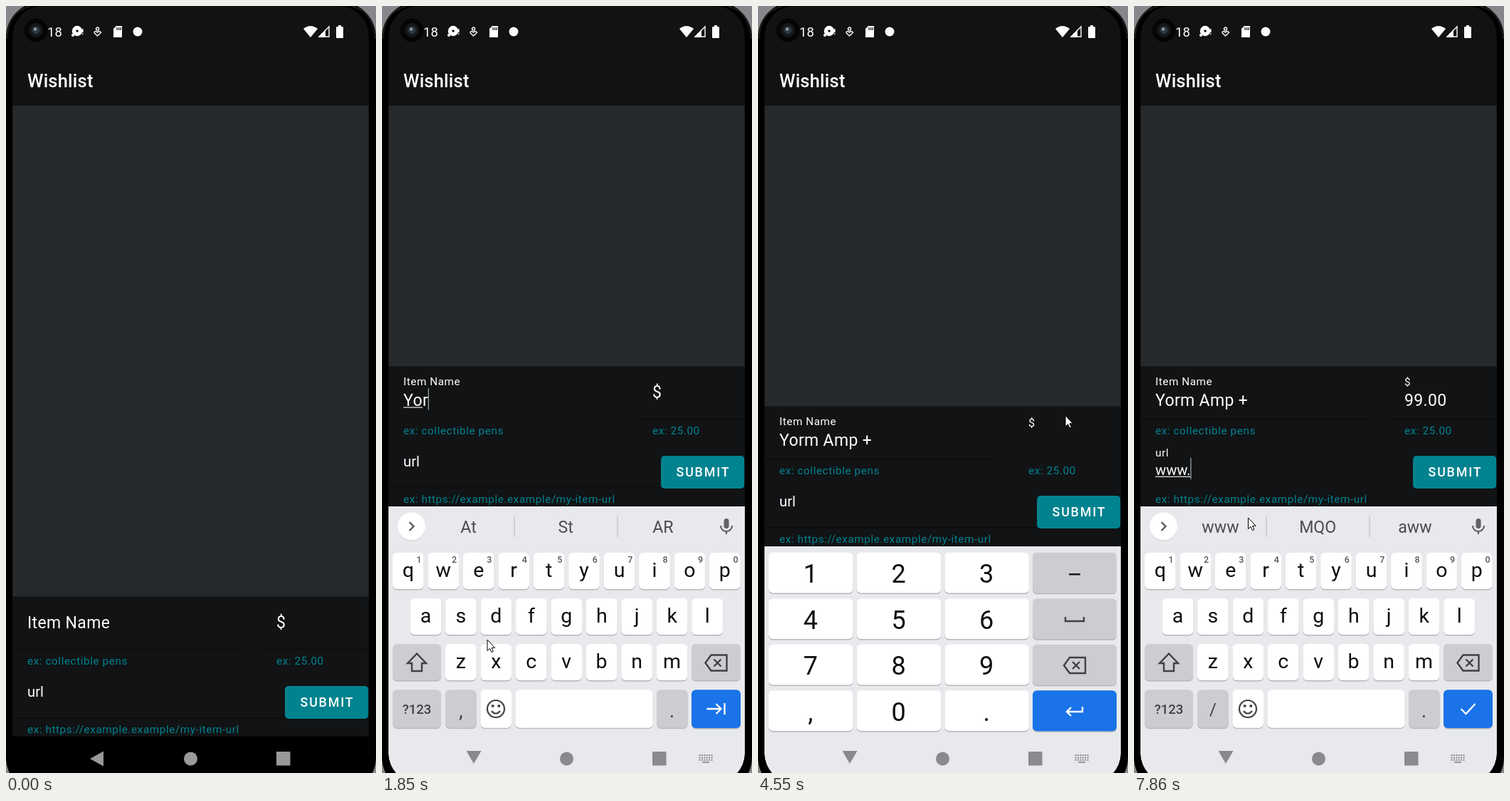
These frames come from a looping animation (520 by 1076 pixels, 8 s). An HTML page with a canvas:

```html
<!DOCTYPE html>
<html lang="en">
<head>
<meta charset="utf-8">
<title>Wishlist</title>
<style>
  html, body { margin: 0; width: 520px; height: 1076px; overflow: hidden; background: #000; }
  canvas { display: block; width: 520px; height: 1076px; }
</style>
</head>
<body>
<canvas id="stage"></canvas>
<script>
const LOOP = 8000, STEP = 66;
const canvas = document.getElementById('stage');
const ctx = canvas.getContext('2d');
const dpr = window.devicePixelRatio || 1;
canvas.width = 520 * dpr;
canvas.height = 1076 * dpr;

const TEAL = '#00838f', INK = '#3f4144', ICON = '#7f8286';

// time, text, underlined range, suggestions
const itemSteps = [
  [0, '', null, null],
  [1590, 'Y', null, ['I', 'A', 'The']],
  [1710, 'Yo', null, ['At', 'St', 'AR']],
  [1850, 'Yor', [0, 2], ['At', 'St', 'AR']],
  [1910, 'Yor', [0, 3], ['For', 'To', 'Or']],
  [1980, 'Yorm', [0, 4], ['Form', 'Storm', 'For']],
  [2180, 'Yorm ', null, ['and', 'is', 'the']],
  [2240, 'Yorm A', null, ['A', 'An', 'I']],
  [2380, 'Yorm Am', null, ['A', 'An', 'I']],
  [2570, 'Yorm Amp', [5, 8], ['Am', 'Amp', 'Ah']],
  [2770, 'Yorm Amp ', [5, 8], ['Amp', 'Amps', 'amplifier']],
  [3030, 'Yorm Amp ', null, ['and', 'for', 'battery']],
  [3170, 'Yorm Amp +', null, ['in', 'for', 'a']]
];
const priceSteps = [[0, ''], [5210, '9'], [5350, '99'], [5540, '99.'], [5740, '99.0'], [5940, '99.00']];
const urlSteps = [
  [0, '', null, null],
  [7460, 'w', null, null],
  [7600, 'ww', [0, 2], ['we', 'www', 'aww']],
  [7700, 'www', [0, 3], ['www', 'MQO', 'aww']],
  [7860, 'www.', [0, 4], ['www', 'MQO', 'aww']]
];

const clamp = v => Math.max(0, Math.min(1, v));
const span = (t, a, b) => clamp((t - a) / (b - a));
const mix = (a, b, p) => a + (b - a) * p;
const smooth = p => p * p * (3 - 2 * p);
const at = (steps, t) => steps.filter(s => s[0] <= t).pop();
const isNumeric = t => t >= 4480 && t < 6930;

function setFont(size, weight = 400, spacing = 0) {
  ctx.font = `${weight} ${size}px Roboto, sans-serif`;
  ctx.letterSpacing = spacing + 'px';
}
function text(str, x, y, size, color, { weight, spacing, align = 'left' } = {}) {
  setFont(size, weight, spacing);
  ctx.textAlign = align;
  ctx.fillStyle = color;
  ctx.fillText(str, x, y);
}
function rect(x, y, w, h, color, r = 0) {
  ctx.fillStyle = color;
  ctx.beginPath();
  ctx.roundRect(x, y, w, h, r);
  ctx.fill();
}
function disc(x, y, r, color) {
  ctx.fillStyle = color;
  ctx.beginPath();
  ctx.arc(x, y, r, 0, 7);
  ctx.fill();
}
function fill(d, x, y, color) {
  ctx.save();
  ctx.translate(x, y);
  ctx.fillStyle = color;
  ctx.fill(new Path2D(d));
  ctx.restore();
}
function line(d, x, y, color, width = 2.2) {
  ctx.save();
  ctx.translate(x, y);
  ctx.strokeStyle = color;
  ctx.lineWidth = width;
  ctx.stroke(new Path2D(d));
  ctx.restore();
}

function drawStatus() {
  disc(42, 34, 16.5, '#050506');
  disc(42, 34, 10, '#15181b');
  disc(42, 34, 5.5, '#2c3640');
  disc(41, 32.5, 2.2, '#8d9aa8');
  text('18', 58, 43, 18.5, '#fff');
  disc(100, 35, 7.2, '#fff');
  disc(100, 35, 1.8, '#111');
  disc(94, 41, 2, '#fff');
  rect(107, 32, 1.6, 5, '#fff');
  rect(107, 38.5, 1.6, 1.6, '#fff');
  line('M0 -6a2 2 0 1 0 .1 0M-5 1L0 6L5 1Q2 -2 0 1Q-2 -2 -5 1', 128.5, 36, '#fff', 1.5);
  fill('M-2 -8H6V8H-6V-4Z', 157, 36, '#fff');
  for (const x of [155.5, 158, 160.5]) rect(x, 30, 1.2, 4, '#111');
  disc(185, 36, 6.5, '#fff');
  fill('M0 8L-10 -4Q0 -12 10 -4Z', 428, 36, '#fff');
  line('M-7 7L7 -7V7Z', 447, 36, '#fff', 1.4);
  fill('M-8 8L2 -2V8Z', 447, 36, '#fff');
  rect(464, 29, 10, 16, '#fff', 1);
  rect(467, 27, 4, 3, '#fff');
}

// Text field: floating label, typed value, caret
function field(f, t) {
  const p = span(t, f.from, f.from + 172);
  text(f.label, f.x, mix(f.bigY, f.smallY, p), mix(f.size, 15.3, p), '#fff', { spacing: mix(f.gap, 0.55, p) });
  const [, value, under] = at(f.steps, t);
  text(value, f.x, f.valueY, f.size, '#fff', { spacing: f.gap });
  const w = n => ctx.measureText(value.slice(0, n)).width;
  if (under) rect(f.x + w(under[0]), f.valueY + 2, w(under[1]) - w(under[0]), 1.2, '#dfe0e0');
  if (t >= f.from + 200 && t < f.until) rect(f.x + w(value.length) - 0.3, f.valueY - 24, 1.2, 30, '#a9adb0');
}
const fields = [
  { label: 'Item Name', x: 30, bigY: 872.7, smallY: 854.9, valueY: 883.5, size: 23, gap: 0.35, steps: itemSteps, from: 770, until: 4420 },
  { label: '$', x: 380, bigY: 872.7, smallY: 854.9, valueY: 883.5, size: 23, gap: 0.35, steps: priceSteps, from: 4400, until: 6860 },
  { label: 'url', x: 30, bigY: 969.3, smallY: 955.3, valueY: 980.7, size: 20.2, gap: 0, steps: urlSteps, from: 6840, until: LOOP }
];

function drawForm(t, dy) {
  ctx.save();
  ctx.translate(0, dy);
  rect(9, 828.6, 501, 300, '#111315');
  const rule = (x, y, w) => rect(x, y, w, 1.2, '#090a0b');
  if (t < 930 || t >= 4420) rule(9, 902, 325);
  if (t < 4420 || t >= 6860) rule(360, 902, 150);
  if (t < 6860) rule(9, 998.5, 501);
  fields.forEach(f => field(f, t));
  const hint = (s, x, y) => text(s, x, y, 15.3, TEAL, { spacing: 0.57 });
  hint('ex: collectible pens', 30, 924);
  hint('ex: 25.00', 380, 924);
  hint('ex: https://example.example/my-item-url', 30, 1020.4);
  rect(392, 955, 117.3, 46, '#08090a', 5);
  rect(392, 954, 117.3, 46, TEAL, 5);
  text('SUBMIT', 413.5, 983.3, 17.85, '#fff', { weight: 500, spacing: 1.85 });
  ctx.restore();
}

function keyCap(x, y, w, h, color = '#fff') {
  rect(x, y + 1.4, w, h, '#b4b6ba', 6);
  rect(x, y, w, h, color, 6);
}
const GREY = '#cccdd2', BLUE = '#1a73e8';
const centered = (s, x, y, size, color, weight) => text(s, x, y, size, color, { weight, align: 'center' });

function drawMic() {
  rect(480.5, 719, 7, 14, '#5f6165', 3.5);
  line('M-8 0A8 8 0 0 0 8 0M0 8V12', 484, 729, '#5f6165');
}
function backspace(x, y) {
  line('M-15 0L-7 -11H15V11H-7ZM-3 -5L7 5M7 -5L-3 5', x, y, INK, 2.4);
}

function drawToolbar(words) {
  disc(41.5, 731, 19.7, '#d6d7da');
  disc(41.5, 730, 19.5, '#fff');
  line(words ? 'M-3 -6L3 0L-3 6' : 'M3 -6L-3 0L3 6', 41.5, 730, '#55575b', 2.3);
  drawMic();
  if (words) {
    words.forEach((w, i) => centered(w, 121.5 + i * 136.7, 739.2, 23.2, '#4a4c50'));
    rect(185.5, 715, 1.2, 30, '#bfc1c5');
    rect(330.5, 715, 1.2, 30, '#bfc1c5');
    return;
  }
  line('M-7 -10H7Q10 -10 10 -7V3L3 10H-7Q-10 10 -10 7V-7Q-10 -10 -7 -10M10 3H3V10M-5 1Q-1 6 4 1M-5 -4H-2M2 -4H5', 107, 730, ICON);
  centered('GIF', 178, 736.5, 19, ICON, 900);
  line('M-9 -9H9V11H-9ZM-5 -3H5M-5 2H5M-5 7H2', 251, 730, ICON);
  rect(246, 718, 10, 5, ICON, 2);
  for (let i = 0; i < 3; i++) {
    ctx.save();
    ctx.translate(323, 730);
    ctx.rotate(i * Math.PI / 3);
    rect(-3.5, -11.5, 7, 23, ICON, 1);
    ctx.restore();
  }
  disc(323, 730, 8.8, ICON);
  disc(323, 730, 4.2, '#e8e9ec');
  rect(366.5, 716, 1.2, 28, '#bfc1c5');
  for (const x of [403.5, 412, 420.5]) disc(x, 730, 2.5, ICON);
}

function drawLetters(upper, url) {
  const rows = [['qwertyuiop', 15, 767], ['asdfghjkl', 39.7, 831], ['zxcvbnm', 89, 895]];
  for (const [letters, left, y] of rows) {
    [...letters].forEach((c, i) => {
      const x = left + i * 49.45;
      keyCap(x, y, 43.6, 51);
      centered(upper ? c.toUpperCase() : c, x + 21.8, y + 33.5, 28.5, '#0d0d0e');
      if (y === 767) centered((i + 1) % 10, x + 37, y + 13.7, 12.5, '#55575b', 500);
    });
  }
  keyCap(15, 895, 68, 51, GREY);
  const arrow = 'M0 -12.5L13 1H7V12H-7V1H-13Z';
  if (upper) fill(arrow, 49, 921, INK);
  line(arrow, 49, 921, INK, 2.4);
  keyCap(435, 895, 69, 51, GREY);
  backspace(469.5, 921.5);

  keyCap(15, 959.3, 68, 53.4, GREY);
  centered('?123', 49, 993, 18.5, INK, 500);
  keyCap(89, 959.3, 43.6, 53.4, GREY);
  centered(url ? '/' : ',', 111, url ? 995 : 998, url ? 24 : 27, INK);
  keyCap(138.4, 959.3, 43.6, 53.4);
  line('M12 0A12 12 0 1 1 -12 0A12 12 0 1 1 12 0M-6 3Q0 10 6 3', 160, 986, INK);
  disc(155.7, 982, 2, INK);
  disc(164.3, 982, 2, INK);
  keyCap(187.5, 959.3, 193, 53.4);
  keyCap(386, 959.3, 43.6, 53.4, GREY);
  centered('.', 407.5, 998, 27, INK);
  keyCap(435, 959.3, 69, 53.7, BLUE);
  line(url ? 'M-10 0L-3 7L10 -7' : 'M-13 0H7M0 -7L7 0L0 7M12 -8V8', 469.5, 986, '#fff', 2.4);
}

function drawNumbers() {
  ['123', '456', '789', ',0.'].forEach((row, r) => {
    const y = 766.8 + r * 64.5;
    [...row].forEach((c, i) => {
      const x = 15 + i * 123.7;
      keyCap(x, y, 118.5, 56.7);
      centered(c, x + 58.8, y + 42.5, 36, '#0d0d0e');
    });
    keyCap(386, y, 118, 57, r === 3 ? BLUE : GREY);
  });
  rect(437, 796, 16, 2.6, '#1c1d1f');
  line('M-13 -3V3H13V-3', 445, 860, INK, 2.4);
  backspace(445, 925);
  line('M12 -7V0H-10M-4 -6L-10 0L-4 6', 444, 990, '#fff', 2.4);
}

function drawNav(color, down, keys) {
  fill(down ? 'M-10.5 -9H10.5L0 9Z' : 'M9 -10.5V10.5L-10 0Z', down ? 129 : 128, down ? 1054 : 1056, color);
  disc(259.5, 1056, 9.5, color);
  rect(380, 1046, 19.5, 19.5, color);
  if (!keys) return;
  for (let r = 0; r < 3; r++)
    for (let i = 0; i < 6; i++) rect(445.5 + i * 3.4, 1050 + r * 3.4, 2, 2, color);
  rect(450, 1060, 10, 1.8, color);
}

function drawKeyboard(t, m) {
  const numeric = isNumeric(t), top = numeric ? 758.3 : 702;
  const rise = span(m, 924, 1230);
  rect(9, top, 501, 400, '#fff');
  ctx.save();
  ctx.translate(0, 123 * Math.pow(1 - rise, 3));
  rect(9, top, 501, 400, '#e8e9ec');
  if (numeric) drawNumbers();
  else {
    const url = t >= 6930;
    drawToolbar(at(url ? urlSteps : itemSteps, t)[3]);
    drawLetters((t >= 1520 && t < 1710) || (t >= 2180 && t < 2240), url);
  }
  // The whole panel fades in from white
  rect(9, top, 501, 400, `rgba(255,255,255,${0.26 * (1 - rise)})`);
  ctx.restore();
  if (rise < 1) {
    rect(9, 1025, 501, 60, `rgba(0,0,0,${0.33 * (1 - rise)})`);
    drawNav(`rgba(185,186,188,${0.75 * (1 - rise)})`, false, true);
  }
  if (rise > 0) drawNav(`rgba(137,138,141,${rise})`, true, true);
}

function cursorAt(m) {
  const glide = (a, c, b, p) => a.map((v, i) => (1 - p) ** 2 * v + 2 * p * (1 - p) * c[i] + p * p * b[i]);
  const home = [148, 889], price = [432, 574.5], url = [160.5, 718];
  if (m < 3450) return glide([310, 1010], [230, 900], home, smooth(span(m, 40, 660)));
  if (m < 6300) return glide(home, [634, 690], price, smooth(span(m, 3432, 4224)));
  return glide(price, [330, 640], url, smooth(span(m, 6270, 6740)));
}
function drawCursor(t, m) {
  if (t < 70) return;
  const [x, y] = cursorAt(m);
  const clicks = [[720, 860], [4220, 4420], [6740, 6860]];
  if (clicks.some(([a, b]) => t >= a && t < b)) disc(x - 0.5, y, 11.3, 'rgba(150,150,0,.88)');
  const arrow = 'M0 0V15.5L3.6 12.3L6 17.6L8.4 16.5L6 11.3H10.6Z';
  fill(arrow, x, y, '#fff');
  line(arrow, x, y, '#000', 1);
}

function draw(t) {
  const m = Math.floor((t + 6) / STEP) * STEP;
  ctx.setTransform(dpr, 0, 0, dpr, 0, 0);
  rect(0, 0, 520, 1076, '#85878a');
  rect(0, -6, 520, 1110, '#000', 50);
  line('M1 46Q3 8 34 0M519 46Q517 8 486 0', 0, 0, '#1d1f21', 2);
  ctx.save();
  ctx.beginPath();
  ctx.roundRect(9.3, 0, 500.4, 1090, 42);
  ctx.clip();
  rect(9, 0, 501, 1076, '#111214');
  rect(9, 139.5, 501, 700, '#25292b');
  drawStatus();
  text('Wishlist', 30, 113.7, 25.5, '#fff', { weight: 500, spacing: 0.2 });
  drawForm(t, t < 930 ? 0 : isNumeric(t) ? -267 : -323);
  if (t < 930) {
    rect(9, 1024.5, 501, 60, '#000');
    drawNav('#999', false, t >= 860);
  } else drawKeyboard(t, m);
  ctx.restore();
  drawCursor(t, m);
}

const start = performance.now();
function frame() {
  draw((performance.now() - start) % LOOP);
  requestAnimationFrame(frame);
}
frame();
</script>
</body>
</html>
```
